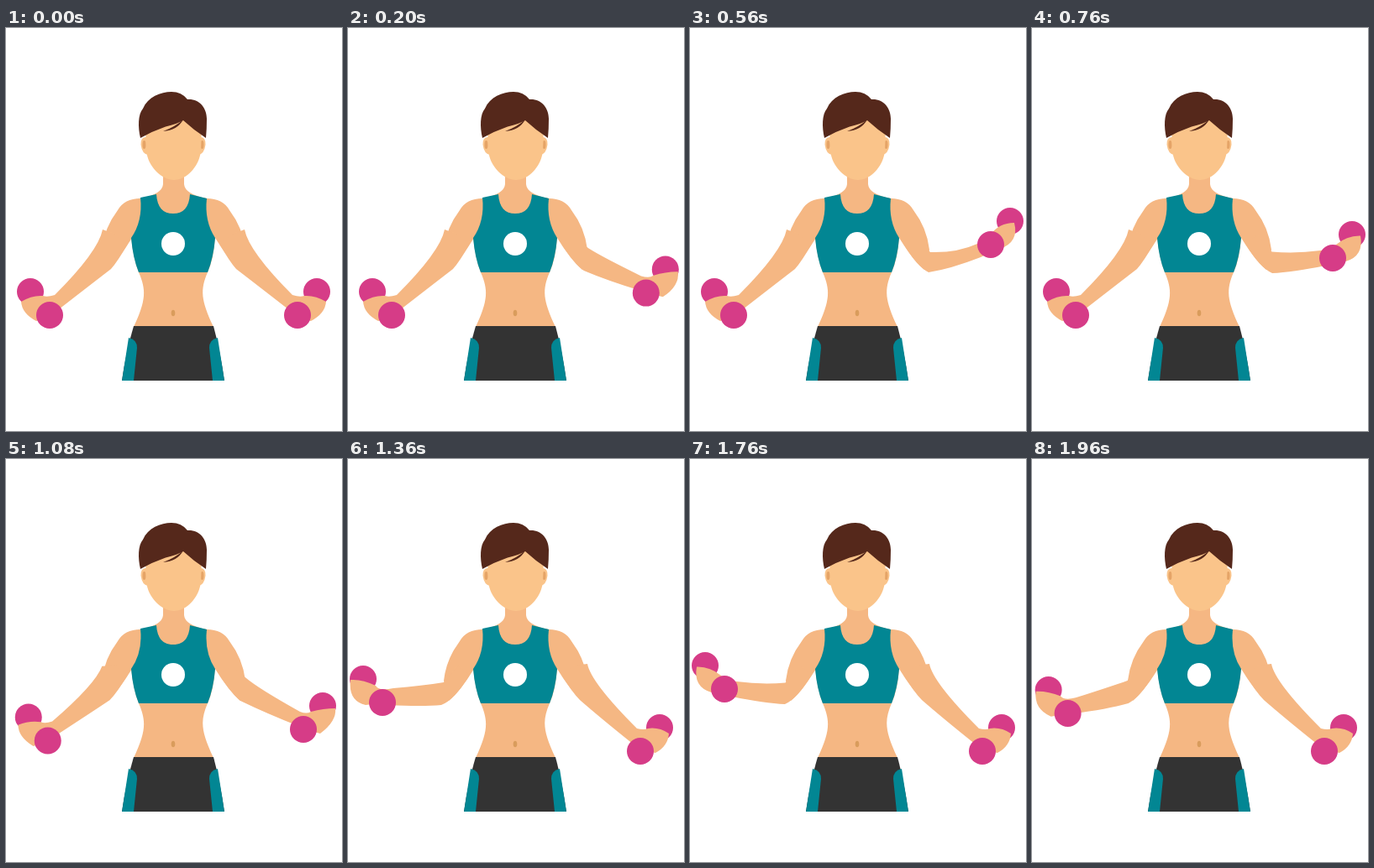
These frames come from a looping animation (400 by 480 pixels, 2000 ms). An HTML page without scripts:

```html
<!DOCTYPE html>
<html lang="en">
<head>
<meta charset="utf-8">
<title>Dumbbell curls</title>
<style>
html, body { margin: 0; width: 100%; height: 100%; overflow: hidden; background: #fff; }
svg { display: block; width: 100vw; height: 100vh; }

.skin { fill: #f5b783; }
.face { fill: #fac48a; }
.teal { fill: #028693; }
.hair { fill: #55281b; }

/* Poses of the right arm; the left one is mirrored */
.arm {
  --start: path("M268 246L284 240Q289 266 341 318Q350 321 355 319Q368 318 381 326Q380 340 363 349Q351 346 336 335Q300 307 274 287Q266 278 254 257Z");
  --rest: path("M268 246L285 244Q289 266 344 321Q352 323 357 321Q370 319 382 327Q381 342 366 350Q352 348 340 340Q300 308 276 287Q267 278 254 257Z");
  --low: path("M268 246L286 261Q300 273 350 301Q358 304 363 301Q378 297 392 297Q394 312 374 327Q362 324 348 318Q310 303 279 288Q269 280 254 257Z");
  --flat: path("M268 246L285 266Q310 270 345 273Q362 277 366 270Q382 262 396 263Q399 288 378 293Q366 291 352 293Q310 295 288 293Q272 287 254 257Z");
  --peak: path("M268 246L286 267Q318 268 342 257Q354 252 358 246Q368 232 386 232Q392 255 369 263Q360 266 346 273Q310 287 284 291Q270 284 254 257Z");
}
.ball {
  --start: path("M370 314h0");
  --rest: path("M371 320h0");
  --low: path("M377 294h0");
  --flat: path("M381 262h0");
  --peak: path("M381 230h0");
  fill: none;
  stroke: #d63c87;
  stroke-width: 32;
  stroke-linecap: round;
}
.arm, .ball { d: var(--start); animation: 2s steps(5) infinite; }
.right path { animation-name: right; }
.left path { animation-name: left; }

@keyframes right {
  0% { d: var(--start); animation-timing-function: ease-in; }
  8% { d: var(--low); }
  18% { d: var(--flat); }
  28% { d: var(--peak); }
  32% { d: var(--peak); animation-timing-function: steps(6); }
  44% { d: var(--flat); }
  54% { d: var(--low); }
  64%, 100% { d: var(--rest); }
}
/* Same curl one second later, cut short by the loop */
@keyframes left {
  0% { d: var(--start); }
  50% { d: var(--start); animation-timing-function: ease-in; }
  58% { d: var(--low); }
  68% { d: var(--flat); }
  78% { d: var(--peak); }
  82% { d: var(--peak); animation-timing-function: steps(6); }
  94% { d: var(--flat); animation-timing-function: linear(0, .6); }
  100% { d: var(--low); }
}
</style>
</head>
<body>
<svg viewBox="0 0 400 480">
  <defs>
    <path id="upper" class="skin" d="M222 200L239 203Q258 203 266 217Q282 238 285 264L279 288Q265 276 249 250L238 232Z"/>
    <path id="stripe" class="teal" d="M146 369Q156 371 156 381L152 420H138Z"/>
    <g id="ear">
      <path class="face" d="M168 130Q160 129 160.500 139Q162 150 169 151Z"/>
      <ellipse cx="164.500" cy="139" rx="2" ry="5" fill="#e5a467"/>
    </g>
  </defs>

  <!-- Body -->
  <path class="skin" d="M187 170V186Q186 198 160 203L149 250Q152 276 158 291C167 312 167 324 152 356H247C232 324 231 312 240 291Q247 276 249 250L239 203Q213 198 212 186V170Z"/>
  <ellipse cx="199" cy="339.500" rx="2.300" ry="3.800" fill="#d99c5c"/>
  <path fill="#333" d="M152 355H247Q255 385 260 420H138Q143 385 152 355Z"/>
  <use href="#stripe"/>
  <use href="#stripe" transform="matrix(-1 0 0 1 398 0)"/>

  <!-- Arms -->
  <g class="right">
    <use href="#upper"/>
    <path class="ball"/>
    <path class="arm skin"/>
    <path class="ball" transform="translate(-23 28)"/>
  </g>
  <g class="left" transform="matrix(-1 0 0 1 399 0)">
    <use href="#upper"/>
    <path class="ball"/>
    <path class="arm skin"/>
    <path class="ball" transform="translate(-23 28)"/>
  </g>

  <!-- Top -->
  <path class="teal" d="M160 202L179 198C180 214 187 221 199 221C211 221 218 214 219 198L239 203Q236 230 249 250Q247 274 240 291H158Q151 274 149 250Q163 230 160 202Z"/>
  <circle cx="199" cy="257" r="14" fill="#fff"/>

  <!-- Head -->
  <use href="#ear"/>
  <use href="#ear" transform="matrix(-1 0 0 1 398 0)"/>
  <path class="face" d="M166 118Q198 96 233 118L232 146C230 166 214 181 200 181C186 181 169 166 167 146Z"/>
  <path class="hair" d="M160 131C157 118 157 103 163 96C169 82 184 76 197 76Q209 76 216 85C230 84 239 95 239 108Q239 121 238 131Q224 122 211 110Q204 114 190 117.500Q174 123 160 131Z"/>
  <path class="hair" d="M187 123Q201 118 211 109Q204 122 187 123Z"/>
</svg>
</body>
</html>
```
